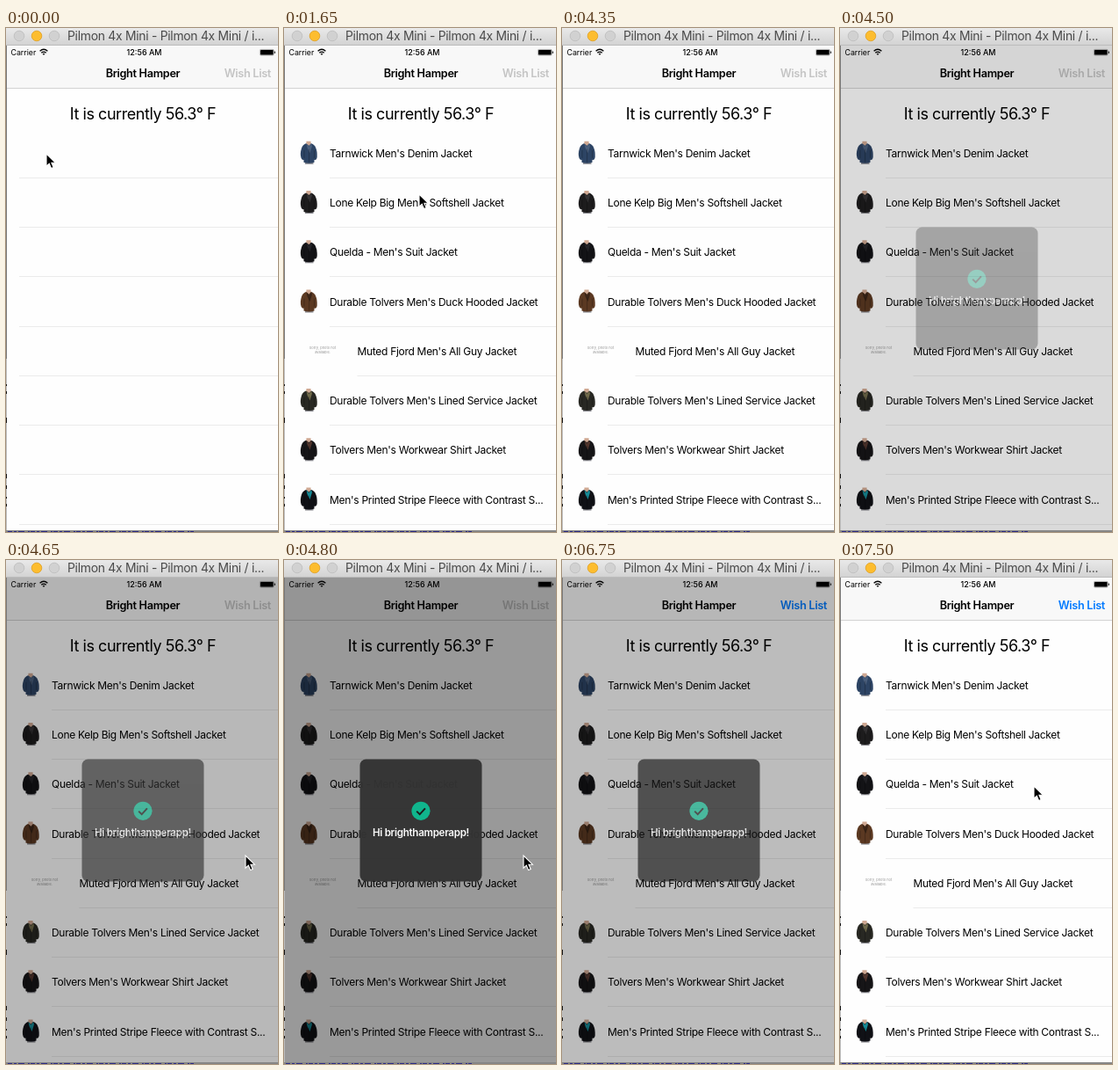
An HTML page for the animation above (8 s loop, 310 px wide and 573 px high).

```html
<!DOCTYPE html>
<html lang="en">
<head>
<meta charset="utf-8">
<title>Shopping list</title>
<style>
  html, body { margin: 0; width: 100%; height: 100%; overflow: hidden; background: #fefefe; }
  svg { display: block; width: 100%; height: 100%; }
  text { font-family: Inter, Roboto, sans-serif; letter-spacing: -.025em; fill: #000; white-space: pre; }
  .item { font-size: 12px; }
  .bold { font-size: 12.7px; font-weight: 600; }
  .status { font-size: 9px; letter-spacing: 0; }
  .mid { text-anchor: middle; }
  .tiny { font-size: 4px; fill: #999; letter-spacing: 0; }
</style>
</head>
<body>
<svg viewBox="0 0 310 573">
  <defs>
    <linearGradient id="chrome" x2="0" y2="1">
      <stop stop-color="#e9e9e9"/><stop offset="1" stop-color="#d2d2d2"/>
    </linearGradient>
  </defs>
  <rect width="310" height="573" fill="#fefefe"/>

  <!-- navigation and status bars -->
  <rect y="20" width="310" height="48" fill="#f8f8f8"/>
  <rect y="68" width="310" height="1" fill="#d2d2d2"/>
  <text class="status" x="5.5" y="31" style="font-size:8.8px">Carrier</text>
  <g fill="none" stroke="#000" stroke-width="1.3">
    <path d="M38.6 26.2Q43 22.4 47.4 26.2M40.3 28.2Q43 26 45.7 28.2"/>
    <path d="M42 29.2h2L43 30.6z" fill="#000" stroke-width=".6"/>
  </g>
  <text class="status mid" x="157.5" y="31" font-weight="500">12:56 AM</text>
  <rect x="289.4" y="24.4" width="15.8" height="6.6" rx="1.2" fill="none" stroke="#777" stroke-width=".6"/>
  <rect x="290" y="25" width="14.6" height="5.4" rx=".6"/>
  <rect x="305.8" y="26.6" width="1" height="2.2"/>
  <text class="bold mid" x="156" y="56">Bright Hamper</text>
  <text class="bold" id="wish" x="302" y="56" text-anchor="end">Wish List</text>
  <text class="mid" x="156" y="104" font-size="18">It is currently 56.3° F</text>

  <g id="emptyRows"></g>
  <g id="fullRows"></g>

  <rect id="dim" x="1" y="20" width="309" height="551"/>
  <g id="hud">
    <rect id="plate" x="86.5" y="226.5" width="139" height="139" rx="7"/>
    <circle cx="156" cy="285.3" r="10.6" fill="#0cb68d"/>
    <path d="M151.2 285.6l3.5 3.5 6.2-6.7" fill="none" stroke="#171717" stroke-width="2"/>
    <text class="mid" x="156" y="314" font-size="11.6" font-weight="600" style="fill:#fff">Hi brighthamperapp!</text>
  </g>

  <!-- window frame and slivers of the desktop behind it -->
  <rect width="310" height="20" fill="url(#chrome)"/>
  <rect y="19" width="310" height="1" fill="#bcbcbc"/>
  <g stroke="#bdbdbd" stroke-width=".8" fill="#d1d1d1">
    <circle cx="15" cy="9" r="5.8"/>
    <circle cx="35" cy="9" r="5.8" fill="#fdbd2f" stroke="#dfa023"/>
    <circle cx="55" cy="9" r="5.8"/>
  </g>
  <text x="70" y="14.3" font-size="13.9" style="fill:#4a4a4a;letter-spacing:-.02em">Pilmon 4x Mini - Pilmon 4x Mini / i...</text>
  <path d="M.5 20V376" stroke="#777"/>
  <path d="M.5 376V573" stroke="#bbb"/>
  <path d="M.5 405V573" stroke="#111" stroke-dasharray="2 6 3 27 6 58 5 8 4 9"/>
  <path d="M0 572H310" stroke="#868686" stroke-width="2"/>
  <path d="M2 572.5H214" stroke="#2b2b86" stroke-dasharray="5 2 3 2 7 4 2 1"/>

  <path id="cursor" d="M0 0V14.2L3.3 11.2 5.6 16.6 8.2 15.5 5.9 10.2H10.3Z" stroke="#fff" stroke-width="1.1"/>
</svg>

<script>
const LOOP = 8000, STEP = 150, ROW = 56.25, TOP = 114.1;
const el = id => document.getElementById(id);
const clamp = v => Math.max(0, Math.min(1, v));

// Name, shell colour, lining colour
const items = [
  ["Tarnwick Men's Denim Jacket", "#2d4464", "#4b5f7c"],
  ["Lone Kelp Big Men's Softshell Jacket", "#1d1c1d", "#343234"],
  ["Quelda - Men's Suit Jacket", "#131316", "#232327"],
  ["Durable Tolvers Men's Duck Hooded Jacket", "#5b3922", "#3a2417"],
  ["Muted Fjord Men's All Guy Jacket"],
  ["Durable Tolvers Men's Lined Service Jacket", "#282823", "#706a4b"],
  ["Tolvers Men's Workwear Shirt Jacket", "#161517", "#51352d"],
  ["Men's Printed Stripe Fleece with Contrast S...", "#101116", "#168a96"],
];

const jacket = (y, shell, lining) => `<g transform="translate(19 ${y})">
  <path d="M6.5 0h5l.5 5H6z" fill="#cfa892"/>
  <path d="M5 22H14.5V26H5z" fill="#8a8a90"/>
  <path d="M6 2.5Q2 4 1 8Q-1 14 .5 19Q2 22 3.5 21L3.5 24Q9.500 26 15.500 24V21Q18 22 18.700 18Q19 11 17 7Q16 4 12 2.500L9.500 5z" fill="${shell}"/>
  <path d="M6.500 2.500l3 3.500 2.500-3.500 1 3-2.500 8-3-6z" fill="${lining}"/>
  <path d="M9.600 9V24M4 10v9M15.500 10v9" stroke="#0006" stroke-width=".6"/>
</g>`;

const placeholder = y => `<text class="tiny mid" x="44" y="${y}">Sorry, photo not</text>
  <text class="tiny mid" x="44" y="${y + 5}">available.</text>`;

const line = (x, i) =>
  `<rect x="${x}" y="${Math.floor(TOP + ROW * (i + 1))}" width="${310 - x}" height="1" fill="#ebebeb"/>`;

el("emptyRows").innerHTML = items.map((_, i) => line(15, i)).join("");
el("fullRows").innerHTML = items.map(([name, shell, lining], i) => {
  const x = shell ? 52 : 83.5, y = TOP + ROW * i;
  return line(x, i) + (shell ? jacket(y + 14.7, shell, lining) : placeholder(y + 26.2)) +
    `<text class="item" x="${x}" y="${y + 32.8}">${name}</text>`;
}).join("");

// [time, x, y]; without a position the pointer is hidden
const pointer = [
  [0, 46, 143], [900, 160, 215], [1050, 298, 302], [1200],
  [1650, 154, 189], [1800], [2100, 229, 172], [2400], [2550, 268, 300],
  [2700, 290, 177], [3000], [3300, 278, 217], [3600], [3900, 274, 301],
  [4200], [4650, 273, 336], [4950], [5250, 196, 263], [5550],
  [5700, 215, 370], [5850, 228, 467], [6000, 222, 400], [6150],
  [6300, 195, 300], [6450, 186, 242], [6750], [7500, 221, 257],
];

function draw(now) {
  const t = Math.floor((now % LOOP) / STEP) * STEP;
  const loaded = t >= 1650;
  el("emptyRows").style.display = loaded ? "none" : "";
  el("fullRows").style.display = loaded ? "" : "none";
  el("wish").style.fill = t >= 5850 ? "#007aff" : "#c4c4c4";

  const fadeOut = clamp((7050 - t) / 460);
  el("dim").style.opacity = .4 * Math.min(clamp((t - 4350) / 430), fadeOut);
  el("hud").style.opacity = Math.min(clamp((t - 4350) / 465), fadeOut);
  const grey = 23 + 28 * clamp((4950 - t) / 150);
  el("plate").style.fill = `rgb(${grey}, ${grey}, ${grey})`;

  const [, x, y] = pointer.findLast(([start]) => start <= t);
  el("cursor").style.display = x === undefined ? "none" : "";
  if (x !== undefined) el("cursor").setAttribute("transform", `translate(${x} ${y})`);
  requestAnimationFrame(draw);
}
draw(performance.now());
</script>
</body>
</html>
```
